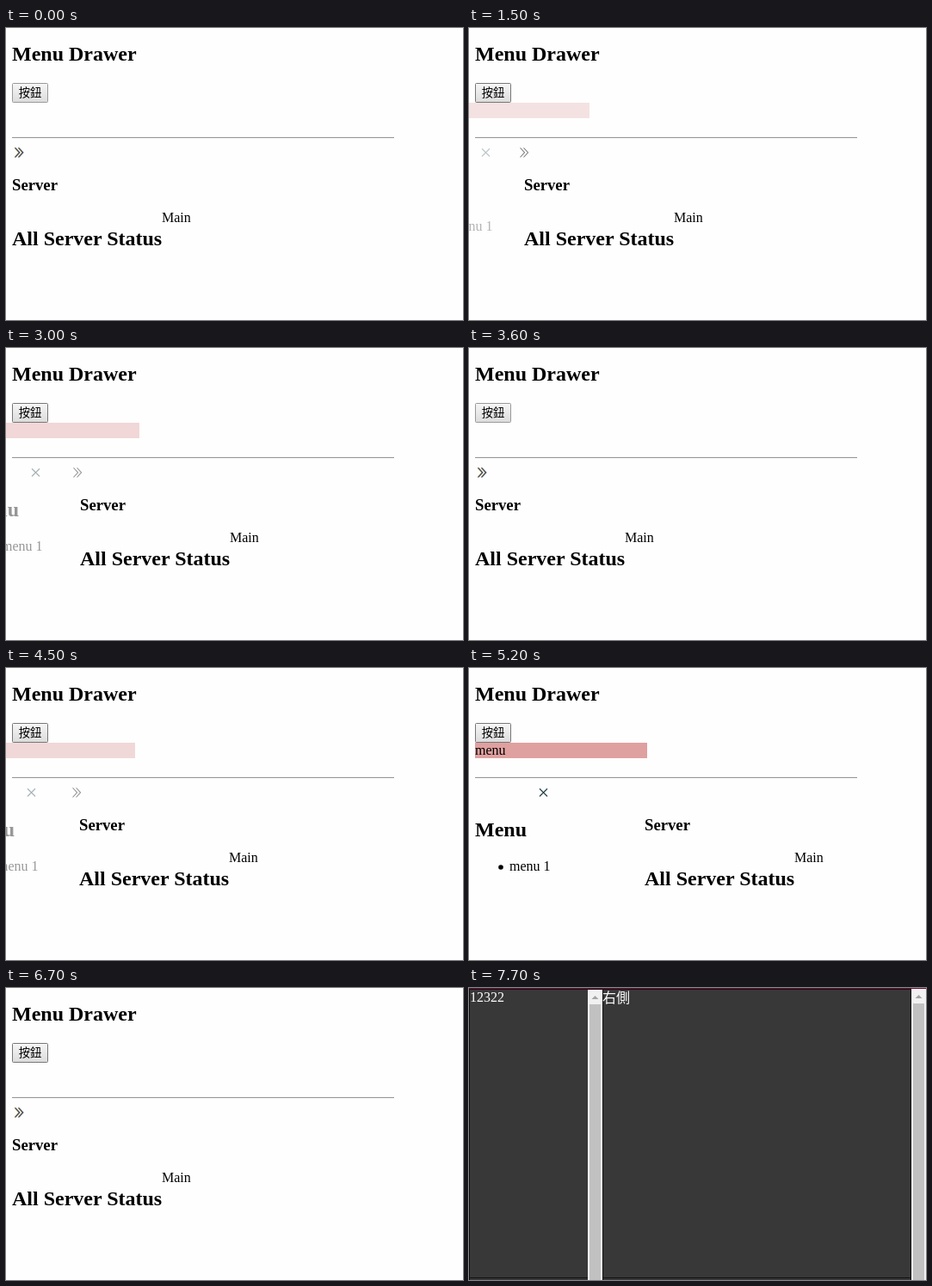
An HTML page that plays this animation: 531x340 px, repeating every 8 s.

```html
<!DOCTYPE html>
<html lang="zh-Hant">
<head>
<meta charset="utf-8">
<title>Menu Drawer</title>
<style>
html, body { margin: 0; height: 100%; overflow: hidden; background: #fefefe; }
svg { display: block; width: 531px; height: 340px; }
text { font: 16px "Liberation Serif", "Noto Sans CJK TC", "Noto Sans CJK", serif; }
.h2 { font-size: 24px; font-weight: bold; }
.h3 { font-size: 18.72px; font-weight: bold; }
.icon { fill: none; stroke: #444; stroke-width: 1.1; }
</style>
</head>
<body>
<svg viewBox="0 0 531 340">
  <defs>
    <linearGradient id="face" x2="0" y2="1">
      <stop offset="0" stop-color="#f6f6f6"/><stop offset="1" stop-color="#dcdcdc"/>
    </linearGradient>
    <linearGradient id="pressed" x2="0" y2="1">
      <stop offset="0" stop-color="#dcdcdc"/><stop offset="1" stop-color="#f0f0f0"/>
    </linearGradient>
    <path id="chevrons" d="M10.5 139.5l5 5.5-5 5.5M14.5 139.5l5 5.5-5 5.5"/>
  </defs>

  <g id="page">
    <text class="h2" x="7" y="38">Menu Drawer</text>
    <rect id="button" x="7.5" y="64.5" width="41" height="22" rx="1"/>
    <text x="28" y="80" text-anchor="middle" style="font-family:'Noto Sans CJK TC','Noto Sans CJK',sans-serif;font-size:13.33px">按鈕</text>
    <path d="M7 127.5H451" stroke="#9a9a9a"/>
    <path d="M7 128.5H451" stroke="#eee"/>

    <g id="arrow" class="icon">
      <g id="fringe">
        <use href="#chevrons" x="-.6" stroke="#d8b45a"/>
        <use href="#chevrons" x=".5" stroke="#5878b8"/>
      </g>
      <use href="#chevrons"/>
    </g>

    <g id="main">
      <text class="h3" x="7" y="189">Server</text>
      <text class="h2" x="7" y="253">All Server Status</text>
      <text x="181" y="226">Main</text>
    </g>

    <g id="drawer">
      <rect x="7" y="87" width="200" height="18" fill="#dfa0a0"/>
      <text x="7" y="101">menu</text>
      <path class="icon" d="M82 140.5l9 9m0-9l-9 9" style="stroke:#244048"/>
      <text class="h2" x="7" y="196">Menu</text>
      <circle cx="37" cy="232" r="2.8"/>
      <text x="47" y="236">menu 1</text>
    </g>
  </g>

  <g id="dark">
    <rect width="531" height="340" fill="#383838"/>
    <rect width="531" height="1" fill="#6c0c3c"/>
    <path d="M0 1.5H514M.5 1V340M155.5 1V340M513.5 1V340M0 337.5H138M156 337.5H513" stroke="#101010" fill="none"/>
    <g id="bar">
      <rect x="138" y="2" width="17" height="338" fill="#f1f1f1"/>
      <rect x="140" y="19" width="13" height="321" fill="#c1c1c1"/>
      <path d="M142.5 13l4-4 4 4z" fill="#a3a3a3"/>
    </g>
    <use href="#bar" x="376" y="-1"/>
    <rect x="514" y="338" width="17" height="2" fill="#f1f1f1"/>
    <rect x="516" y="338" width="13" height="2" fill="#c1c1c1"/>
    <text x="1" y="16" fill="#fff">12322</text>
    <text x="155" y="17" fill="#fff" font-weight="300">右側</text>
  </g>
</svg>
<script>
const LOOP = 8000, SLIDE = 1000;
// Each visit to the drawer: start of opening, start of closing
const visits = [[1303, 2655], [4257, 5745]];
const $ = id => document.getElementById(id);
const within = (t, a, b) => t >= a && t < b;
const show = (id, on) => $(id).setAttribute('display', on ? 'inline' : 'none');

// CSS "ease": cubic-bezier(.25, .1, .25, 1)
function ease(x) {
  if (x <= 0) return 0;
  if (x >= 1) return 1;
  const curve = (a, b, s) => 3 * a * s * (1 - s) ** 2 + 3 * b * s * s * (1 - s) + s ** 3;
  let lo = 0, hi = 1;
  for (let i = 0; i < 24; i++) {
    const mid = (lo + hi) / 2;
    if (curve(.25, .25, mid) < x) lo = mid; else hi = mid;
  }
  return curve(.1, 1, lo);
}

function place(id, dx, opacity = 1) {
  $(id).setAttribute('transform', `translate(${Math.round(dx)})`);
  $(id).setAttribute('opacity', opacity);
}

function draw(t) {
  let open = 0, closing = false;
  for (const [a, b] of visits) {
    open += ease((t - a) / SLIDE) - ease((t - b) / SLIDE);
    closing ||= within(t, b, b + SLIDE);
  }
  place('main', 197 * open);
  place('arrow', 170 * open, 1 - open);
  place('drawer', (closing ? -87 : -95) * (1 - open), open);
  show('fringe', open < .004);

  const hover = within(t, 900, 3400) || t >= 3900;
  const down = within(t, 1300, 1400) || within(t, 2600, 2700);
  $('button').setAttribute('fill', down ? 'url(#pressed)' : 'url(#face)');
  $('button').setAttribute('stroke', hover ? '#777' : '#999');

  show('page', t < 7700);
  show('dark', t >= 7700);
}

const start = performance.now();
function tick() {
  draw((performance.now() - start) % LOOP);
  requestAnimationFrame(tick);
}
tick();
</script>
</body>
</html>
```
